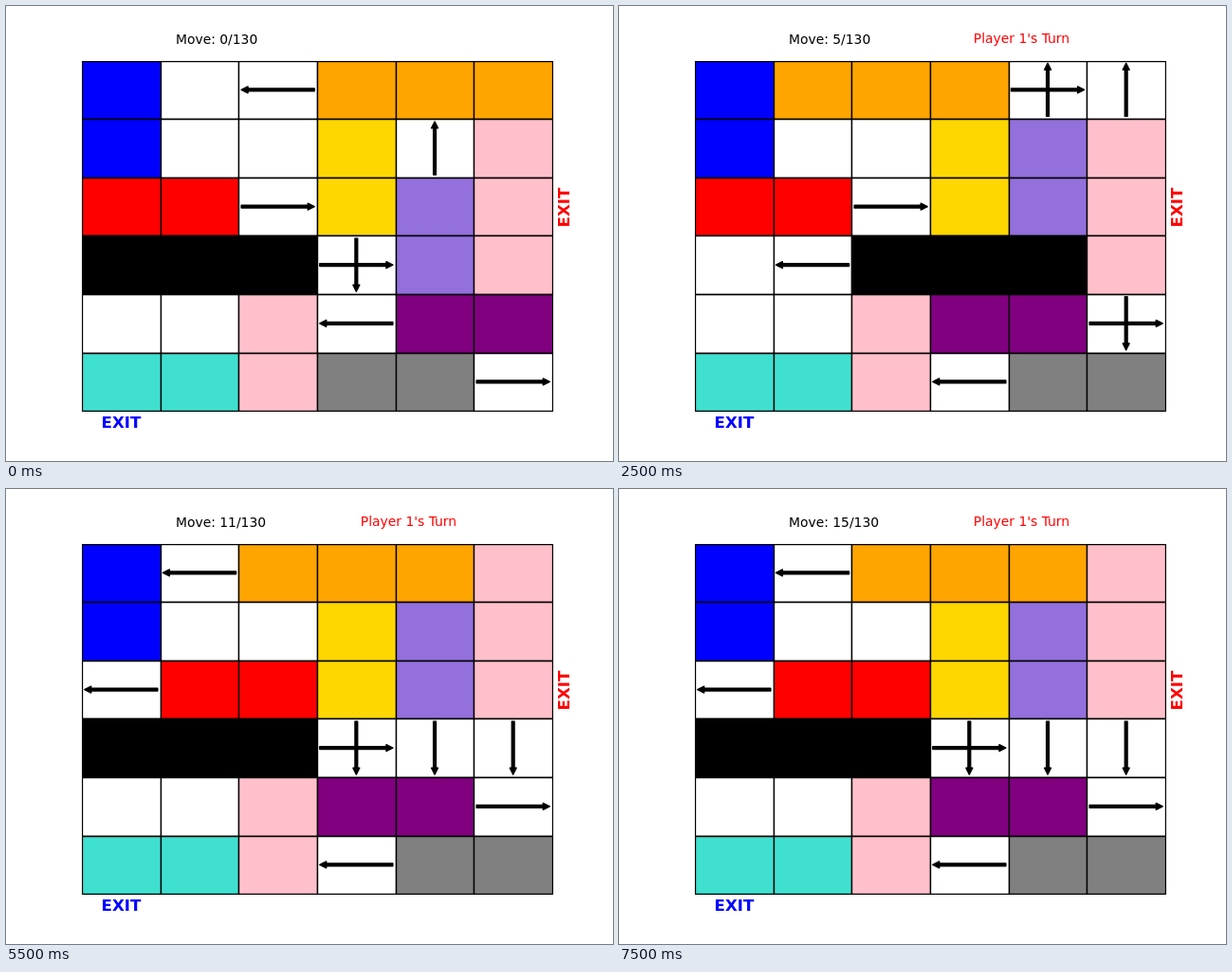
Recreate the animation shown at these times as an HTML page with a canvas. Size 640 px wide and 480 px high, loop 8000 ms.

```html
<!DOCTYPE html>
<html lang="en">
<head>
<meta charset="utf-8">
<title>Sliding cars</title>
<style>
  html, body { margin: 0; width: 100%; height: 100%; overflow: hidden; background: #fff; }
  canvas { display: block; }
</style>
</head>
<body>
<canvas id="stage" width="640" height="480"></canvas>
<script>
const ctx = document.getElementById('stage').getContext('2d');
const SIZE = 6, LEFT = 80, TOP = 57.6, CELL_W = 496 / SIZE, CELL_H = 369.6 / SIZE;
const STEP = 500, LOOP = 8000, LIMIT = 130;
const PT = 100 / 72; // one point in pixels

const car = (color, row, col, len, vertical) => ({ color, row, col, len, vertical });
const START = {
  blue: car('blue', 0, 0, 2, true),
  orange: car('orange', 0, 3, 3, false),
  gold: car('gold', 1, 3, 2, true),
  violet: car('mediumpurple', 2, 4, 2, true),
  rose: car('pink', 1, 5, 3, true),
  red: car('red', 2, 0, 2, false),
  black: car('black', 3, 0, 3, false),
  purple: car('purple', 4, 4, 2, false),
  pink: car('pink', 4, 2, 2, true),
  gray: car('gray', 5, 3, 2, false),
  teal: car('turquoise', 5, 0, 2, false)
};

const MOVES = [
  ['gray', 1], ['purple', -1], ['violet', -1], ['black', 2], ['orange', -2],
  ['black', -2], ['rose', -1], ['gray', -1], ['red', 1], ['gray', 1],
  ['orange', 1], ['purple', 1], ['black', 1], ['purple', -1], ['black', -1]
];

function carsAfter(count) {
  const cars = {};
  for (const name in START) cars[name] = { ...START[name] };
  for (const [name, shift] of MOVES.slice(0, count)) {
    const c = cars[name];
    if (c.vertical) c.row += shift; else c.col += shift;
  }
  return Object.values(cars);
}

// The cell a given number of places along the car's own axis
const cellAt = (c, i) => c.vertical ? [c.row + i, c.col] : [c.row, c.col + i];

function fillGrid(cars) {
  const grid = Array.from({ length: SIZE }, () => Array(SIZE).fill(null));
  for (const c of cars) {
    for (let i = 0; i < c.len; i++) {
      const [r, k] = cellAt(c, i);
      grid[r][k] = c.color;
    }
  }
  return grid;
}

const lineX = col => Math.floor(LEFT + col * CELL_W + 0.5) + 0.5;
const lineY = row => Math.floor(TOP + row * CELL_H + 0.5) + 0.5;

function drawGrid(grid) {
  ctx.save();
  ctx.beginPath();
  ctx.rect(80, 58, 497, 370);
  ctx.clip();
  ctx.strokeStyle = 'black';
  ctx.lineWidth = PT;
  ctx.lineJoin = 'miter';
  for (let r = 0; r < SIZE; r++) {
    for (let k = 0; k < SIZE; k++) {
      const x = lineX(k), y = lineY(r);
      ctx.beginPath();
      ctx.rect(x, y, lineX(k + 1) - x, lineY(r + 1) - y);
      ctx.fillStyle = grid[r][k] || 'white';
      ctx.fill();
      ctx.stroke();
    }
  }
  ctx.restore();
}

function drawArrow(row, col, vertical, dir) {
  const half = (vertical ? CELL_H : CELL_W) / 2 - 2 * PT;
  const head = 5 * PT, wing = 2.5 * PT, tail = PT;
  ctx.save();
  ctx.translate(LEFT + (col + 0.5) * CELL_W, TOP + (row + 0.5) * CELL_H);
  ctx.rotate((vertical ? Math.PI / 2 : 0) + (dir < 0 ? Math.PI : 0));
  ctx.beginPath();
  ctx.moveTo(-half, -tail);
  ctx.lineTo(half - head, -tail);
  ctx.lineTo(half - head, -wing);
  ctx.lineTo(half, 0);
  ctx.lineTo(half - head, wing);
  ctx.lineTo(half - head, tail);
  ctx.lineTo(-half, tail);
  ctx.closePath();
  ctx.fillStyle = ctx.strokeStyle = 'black';
  ctx.lineWidth = PT;
  ctx.lineJoin = 'round';
  ctx.fill();
  ctx.stroke();
  ctx.restore();
}

function drawArrows(cars, grid, locked) {
  for (const c of cars) {
    if (c.color === locked) continue;
    for (const dir of [-1, 1]) {
      const [r, k] = cellAt(c, dir < 0 ? -1 : c.len);
      if (grid[r] && grid[r][k] === null) drawArrow(r, k, c.vertical, dir);
    }
  }
}

function write(text, x, y, color, size, weight = 'normal', align = 'left', angle = 0) {
  ctx.save();
  ctx.translate(x, y);
  ctx.rotate(angle);
  ctx.font = `${weight} ${size * PT}px "DejaVu Sans", sans-serif`;
  ctx.textAlign = align;
  ctx.fillStyle = color;
  ctx.fillText(text, 0, 0);
  ctx.restore();
}

function draw(count) {
  const first = count === 0 || count % 2 === 1;
  const cars = carsAfter(count);
  const grid = fillGrid(cars);
  ctx.fillStyle = 'white';
  ctx.fillRect(0, 0, 640, 480);
  drawGrid(grid);
  drawArrows(cars, grid, first ? 'blue' : 'red');
  write(`Move: ${count}/${LIMIT}`, 179, 40, 'black', 10);
  if (count > 0) {
    if (first) write("Player 1's Turn", 373.8, 39, 'red', 10);
    else write("Player 2's Turn", 374.7, 39, 'blue', 10);
  }
  write('EXIT', 121.4, 445, 'blue', 12, 'bold', 'center');
  write('EXIT', 594, 212.5, 'red', 12, 'bold', 'center', -Math.PI / 2);
}

function tick() {
  draw(Math.floor(performance.now() % LOOP / STEP));
  requestAnimationFrame(tick);
}
tick();
</script>
</body>
</html>
```
